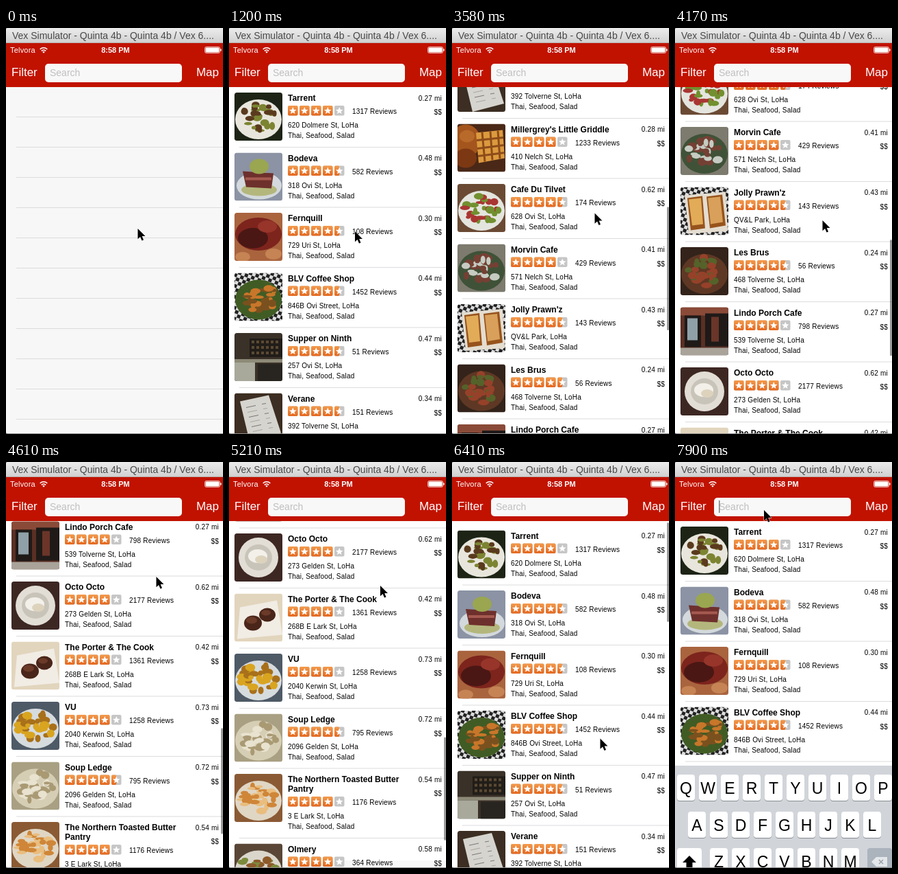
These frames come from a looping animation (317x591 px, 8 s). An HTML page:

```html
<!DOCTYPE html>
<html lang="en">
<head>
<meta charset="utf-8">
<title>Restaurant list</title>
<style>
  html, body { margin: 0; width: 100%; height: 100%; overflow: hidden; background: #f7f7f7; }
  svg { display: block; width: 100vw; height: 100vh; font: 10px "Liberation Sans", Arial, sans-serif; }
  .name { font-size: 12px; font-weight: bold; }
  .small { letter-spacing: .2px; }
  .end { text-anchor: end; }
  .mid { text-anchor: middle; }
  .bar { font-size: 17px; fill: #fff; }
</style>
</head>
<body>
<svg id="stage" viewBox="0 0 317 591" preserveAspectRatio="none">
  <defs>
    <clipPath id="round"><rect width="70" height="70" rx="3.5"/></clipPath>
    <linearGradient id="title" x2="0" y2="1"><stop stop-color="#ececec"/><stop offset="1" stop-color="#d0d0d0"/></linearGradient>
    <linearGradient id="orange" x2="0" y2="1"><stop stop-color="#f39a4c"/><stop offset="1" stop-color="#e4681f"/></linearGradient>
    <pattern id="check" width="10" height="10" patternUnits="userSpaceOnUse" patternTransform="rotate(20)">
      <rect width="10" height="10" fill="#ddd"/><path d="M0 0h5v10h5V5H0z" fill="#222"/>
    </pattern>
    <path id="star" d="M0-5.4 1.5-1.7 5.3-1.6 2.3.9 3.3 4.6 0 2.5-3.3 4.6-2.3.9-5.3-1.6-1.5-1.7z" fill="#fff"/>
  </defs>
  <rect width="317" height="591" fill="#f7f7f7"/>
  <g id="empty" fill="#dcdcdd"></g>
  <g id="list">
    <rect y="-80" width="317" height="1700" fill="#fff"/>
    <g id="photos"></g>
    <g id="rows"></g>
  </g>
  <rect id="scrollbar" x="314" width="3" rx="1.5" fill="#000" fill-opacity=".4"/>

  <rect width="317" height="86" fill="#c11200"/>
  <rect width="317" height="22" fill="url(#title)"/>
  <rect y="21" width="317" height="1" fill="#b9b0ae"/>
  <text x="9" y="16" font-size="14" fill="#484848">Vex Simulator - Quinta 4b - Quinta 4b / Vex 6....</text>
  <g fill="#fff">
    <text x="6" y="36" font-size="11" letter-spacing=".2">Telvora</text>
    <text x="160" y="36" font-size="11" font-weight="bold" class="mid">8:58 PM</text>
    <path d="M49.7 31a7.5 7.5 0 0 1 10.6 0M51.8 33.4a4.6 4.6 0 0 1 6.4 0" fill="none" stroke="#fff" stroke-width="1.5"/>
    <path d="M53.2 34.8a2.6 2.6 0 0 1 3.6 0L55 36.8z"/>
    <rect x="290.5" y="27.5" width="22" height="9" rx="2" fill="none" stroke="#fff" stroke-opacity=".7"/>
    <rect x="291.5" y="28.5" width="20" height="7" rx="1"/>
    <rect x="313.2" y="30.3" width="1.4" height="3.4" rx=".7"/>
  </g>
  <text x="8" y="70" class="bar">Filter</text>
  <text x="311" y="70" class="bar end">Map</text>
  <rect x="57" y="52" width="200" height="27" rx="5" fill="#f8f8f8"/>
  <text x="64" y="70" font-size="14" fill="#bfbfbf">Search</text>
  <g id="keyboard"></g>
  <path d="M0 590.5H317" stroke="#8c8c8c"/>
  <path d="M0 588v3h3Q0 590.500 0 588M0 0h2Q0 0 0 2" fill="#555"/>
  <path id="pointer" d="M0 0V15.300L3.600 12 6 17.500 8.500 16.400 6.200 11.100H11z" fill="#000" stroke="#fff" stroke-width="1" paint-order="stroke"/>
</svg>
<script>
const $ = id => document.getElementById(id);
const ROW = 87.5, VIEW = 504, TOP = 86;

// name (/ breaks the line) | street | miles | reviews | rating | backdrop, dish and two food colours
const places = `Tarrent|620 Dolmere St|0.27|1317|4|#1d2416 #e8e6dc #5a3a1d #7c8432
Bodeva|318 Ovi St|0.48|582|4.5|#8b93a4 #d3d9dc #6e302c #9aa650
Fernquill|729 Uri St|0.30|108|4.5|#a9643e #7d241d #4a1714 #c68354
BLV Coffee Shop|846B Ovi Street|0.44|1452|4.5|url(#check) #405c24 #c8762a #7a511e
Supper on Ninth|257 Ovi St|0.47|51|4.5|#3a3128 #211d19 #8d8a78 #5b4a32
Verane|392 Tolverne St|0.34|151|4.5|#3c2e22 #d6d4ce #a9a6a0 #777777
Millergrey's Little Griddle|410 Nelch St|0.28|1233|4|#4a2817 #a4551d #7c3813 #dc9a3f
Cafe Du Tilvet|628 Ovi St|0.62|174|4.5|#6b4a34 #e4e5de #71902f #a93632
Morvin Cafe|571 Nelch St|0.41|429|4|#7d7a6e #3f5238 #c6cbc2 #754034
Jolly Prawn'z|QV&amp;L Park|0.43|143|4.5|url(#check) #d8a05a #97531c #e2ab58
Les Brus|468 Tolverne St|0.24|56|4.5|#33231a #5e3824 #96412a #55622a
Lindo Porch Cafe|539 Tolverne St|0.27|798|4|#5a2f24 #1f1a18 #8fa0a8 #a9a39a
Octo Octo|273 Gelden St|0.62|2177|4|#3d2723 #e2ded6 #c9c4ba #f3f0ea
The Porter &amp; The Cook|268B E Lark St|0.42|1361|4|#e2d5bd #f1ece4 #4a2519 #6b3a28
VU|2040 Kerwin St|0.73|1258|4|#4e5a66 #d6dbde #d9a420 #a8701a
Soup Ledge|2096 Gelden St|0.72|795|4.5|#a9a083 #d6ceb4 #a99a74 #e8e2cf
The Northern Toasted Butter/Pantry|3 E Lark St|0.54|1176|4|#8a5a34 #e0d6c4 #cf8638 #e9bd7e
Olmery|715 Kerwin St|0.58|364|4|#5a4636 #dad6cc #8d5a2a #7c8a3c`.split("\n").map(line => line.split("|"));

const poly = (points, fill) => `<polygon points="${points}" fill="${fill}"/>`;
const oval = (x, y, rx, ry, fill) => `<ellipse cx="${x}" cy="${y}" rx="${rx}" ry="${ry}" fill="${fill}"/>`;
const box = (x, y, w, h, fill, rx = 0) => `<rect x="${x}" y="${y}" width="${w}" height="${h}" rx="${rx}" fill="${fill}"/>`;
const repeat = (n, draw) => Array.from({ length: n }, (_, i) => draw(i)).join("");
const text = (x, y, words, cls = "small") => `<text x="${x}" y="${y}" class="${cls}">${words}</text>`;

// Photos that are not simply a dish of mixed food
const scenes = {
  1: (p, a, b) => oval(36, 48, 33, 20, p) + oval(36, 54, 26, 9, "#b4b77c") + poly("12,27 57,30 54,52 17,50", a) +
    box(16, 36, 38, 4, "#a55a50") + oval(36, 20, 14, 11, b),
  2: (p, a, b) => oval(35, 31, 34, 24, p) + oval(27, 37, 22, 15, a) + oval(48, 20, 14, 9, "#97352a") +
    oval(57, 60, 12, 8, b) + oval(12, 64, 11, 7, b),
  4: (p, a, b) => box(22, 8, 48, 27, p) + repeat(18, i => box(25 + i % 6 * 7, 11 + (i / 6 | 0) * 8, 4, 4, b)) +
    box(0, 38, 70, 5, a) + box(0, 43, 30, 27, "#a8a99b") + box(34, 45, 36, 25, "#28241f"),
  5: (p, a, b) => poly("8,12 50,3 68,58 22,70", p) +
    repeat(6, i => `<path d="M${17 + i * 2} ${21 + i * 7}l14-3m9-2 6-1" stroke="${i % 2 ? a : b}"/>`),
  6: (p, a, b) => oval(12, 25, 22, 24, p) + oval(12, 50, 16, 14, a) + oval(14, 18, 11, 9, "#b86a2b") +
    poly("27,13 66,9 69,50 31,57", b) +
    `<path d="M36 12l4 43m8-44 3 42m8-43 3 41M28 24l39-4M29 36l39-5M30 47l39-5" stroke="#8d4c18" stroke-width="3"/>`,
  9: (p, a, b) => poly("6,12 66,7 69,64 12,68", "#e4ddd0") + poly("10,16 32,13 36,60 15,63", a) +
    poly("12,18 30,16 33,54 17,56", b) + poly("38,14 61,11 66,56 43,60", a) + poly("40,16 58,14 62,51 44,54", p),
  11: (p, a, b) => box(0, 0, 70, 12, "#8a4a38") + box(6, 12, 24, 46, p) + box(10, 16, 15, 32, a) +
    box(36, 9, 34, 48, p) + box(45, 14, 11, 36, "#6b3529") + box(0, 59, 70, 11, b),
  12: (p, a, b) => oval(35, 35, 29, 29, p) + oval(35, 35, 20, 19, a) + oval(34, 33, 14, 10, b) + oval(39, 38, 9, 6, "#ddd3bd"),
  13: (p, a, b) => poly("8,20 62,10 70,60 4,66", p) + oval(27, 43, 13, 11, a) + oval(48, 31, 12, 10, a) +
    oval(25, 39, 8, 5, b) + oval(46, 28, 7, 4, b)
};

function dish(index, plate, a, b) {
  let seed = index * 7919 + 17;
  const rnd = () => (seed = seed * 16807 % 2147483647) / 2147483647;
  rnd();
  return oval(35, 39, 34, 29, plate) + repeat(30, i => {
    const angle = rnd() * 6.28, r = Math.sqrt(rnd());
    return oval(35 + 26 * r * Math.cos(angle), 36 + 21 * r * Math.sin(angle), 3 + rnd() * 5, 2 + rnd() * 4, i % 2 ? a : b);
  });
}

function photo(index, y, colours) {
  const [back, ...rest] = colours.split(" ");
  const scene = scenes[index] ? scenes[index](...rest) : dish(index, ...rest);
  return `<g transform="translate(8 ${y + 8})" clip-path="url(#round)">${box(0, 0, 70, 70, back)}${scene}</g>`;
}

const stars = (rating, y) => repeat(5, i => {
  const x = 86 + i * 17, full = Math.max(0, Math.min(1, rating - i));
  return box(x, y, 14.500, 14.500, "#c6c6c6", 2) + (full ? box(x, y, 14.500 * full, 14.500, "url(#orange)", 2) : "") +
    `<use href="#star" x="${x + 7.25}" y="${y + 7.5}"/>`;
});

let y = TOP;
places.forEach(([name, street, miles, reviews, rating, colours], index) => {
  const lines = name.split("/"), low = y + (lines.length - 1) * 14;
  $("photos").innerHTML += photo(index, y, colours);
  $("rows").innerHTML += lines.map((line, i) => text(86, y + 20 + i * 14, line, "name")).join("") +
    stars(+rating, low + 27) + text(180, low + 39, reviews + " Reviews") +
    text(86, low + 59, street + ", LoHa") + text(86, low + 74, "Thai, Seafood, Salad") +
    text(311, y + 19.5, miles + " mi", "small end") + text(311, y + 40, "$$", "small end") +
    box(15, low + 87, 302, 1, "#dcdcde");
  y = low + ROW;
});

$("empty").innerHTML = repeat(11, i => `<rect x="15" y="${129 + i * 44}" width="302" height="1"/>`);

const key = (x, y, w, label = "", fill = "#fff") =>
  box(x, y + 1, w, 38, "#888c92", 4) + box(x, y, w, 38, fill, 4) +
  `<text x="${x + w / 2}" y="${y + 28}" class="mid" font-size="23">${label}</text>`;
const keyRow = (letters, x, y) => repeat(letters.length, i => key(x + i * 32, y, 26, letters[i]));
$("keyboard").innerHTML = box(0, 442, 317, 149, "#d1d5da") +
  keyRow("QWERTYUIOP", 3, 455) + keyRow("ASDFGHJKL", 19, 509) + keyRow("ZXCVBNM", 51, 562) +
  key(3, 562, 36) + `<path d="M21 573l-10 10h5.500v8h9v-8H31z"/>` +
  key(281, 562, 36, "", "#abb3bd") +
  `<path d="M287 582l7-7h16v14h-16z" fill="#e4e7ea"/><path d="M298 579l6 6m0-6-6 6" stroke="#98a0aa" stroke-width="1.5"/>` +
  box(64, 56, 1.5, 18, "#808080");

// Screen refreshes about every 150 ms while something moves
const ticks = [0, 900, 1050, 1200];
for (let i = 0, t = 1640; i < 40; i++) {
  ticks.push(t);
  t += [6, 14, 19].includes(i) ? 140 : 150;
}
ticks.push(7900);

const scrollKeys = [[2830, 0], [2980, 35], [3130, 130], [3280, 275], [3430, 395], [3580, 479.5], [3730, 535],
  [3870, 570], [4020, 590], [4170, 650], [4320, 770], [4460, 890], [4610, 970], [4760, 1015], [5060, 1045],
  [5210, 1040], [5360, 930], [5510, 640], [5660, 376], [5810, 210], [5960, 110], [6110, 35], [6260, -16],
  [6410, -5.5], [6560, -1], [6710, 0]];
const pointerKeys = [[0, 192.5, 292], [900, 190, 293], [1200, 184, 296], [1640, 183, 300], [2680, 171, 397],
  [2830, 170, 385], [3280, 205, 285], [3580, 208.5, 269.5], [3870, 212, 370], [4020, 213, 360], [4320, 218, 200],
  [4610, 219.5, 167], [5060, 221, 160], [5210, 221, 180], [5360, 224, 290], [5510, 227, 260], [5660, 228.5, 188],
  [5810, 225, 260], [5960, 220, 380], [6410, 216.5, 402.5], [6860, 190, 330], [7160, 134, 107], [7460, 130, 70]];
const barKeys = [[2830, 0], [2980, 1], [6560, 1], [6860, 0]];

function at(keys, t, column = 1) {
  const next = keys.findIndex(k => k[0] > t);
  if (next < 1) return keys[next < 0 ? keys.length - 1 : 0][column];
  const a = keys[next - 1], b = keys[next];
  return a[column] + (b[column] - a[column]) * (t - a[0]) / (b[0] - a[0]);
}

// Rows not yet seen count with the 44 px estimate in the content height
function contentHeight(past) {
  const deepest = Math.max(...past.map(t => at(scrollKeys, t)));
  const seen = Math.min(20, Math.floor((deepest + VIEW) / ROW) + 1);
  return seen * ROW + (20 - seen) * 44 + (seen > 16 ? 14 : 0);
}

function draw(now) {
  const past = ticks.filter(t => t <= now % 8000), t = past[past.length - 1];
  const scroll = at(scrollKeys, t), ratio = VIEW / contentHeight(past);
  $("list").setAttribute("visibility", t < 900 ? "hidden" : "visible");
  $("list").setAttribute("transform", `translate(0 ${-scroll})`);
  $("photos").setAttribute("opacity", Math.max(0, Math.min(1, (t - 900) / 300)));
  $("scrollbar").setAttribute("y", TOP + 2 + Math.max(0, scroll) * ratio);
  $("scrollbar").setAttribute("height", (VIEW - 4) * ratio + Math.min(0, scroll));
  $("scrollbar").setAttribute("opacity", at(barKeys, t));
  $("keyboard").setAttribute("visibility", t < 7900 ? "hidden" : "visible");
  $("pointer").setAttribute("transform", `translate(${at(pointerKeys, t)} ${at(pointerKeys, t, 2)})`);
}

const start = performance.now();
function loop() {
  draw(performance.now() - start);
  requestAnimationFrame(loop);
}
loop();
</script>
</body>
</html>
```
